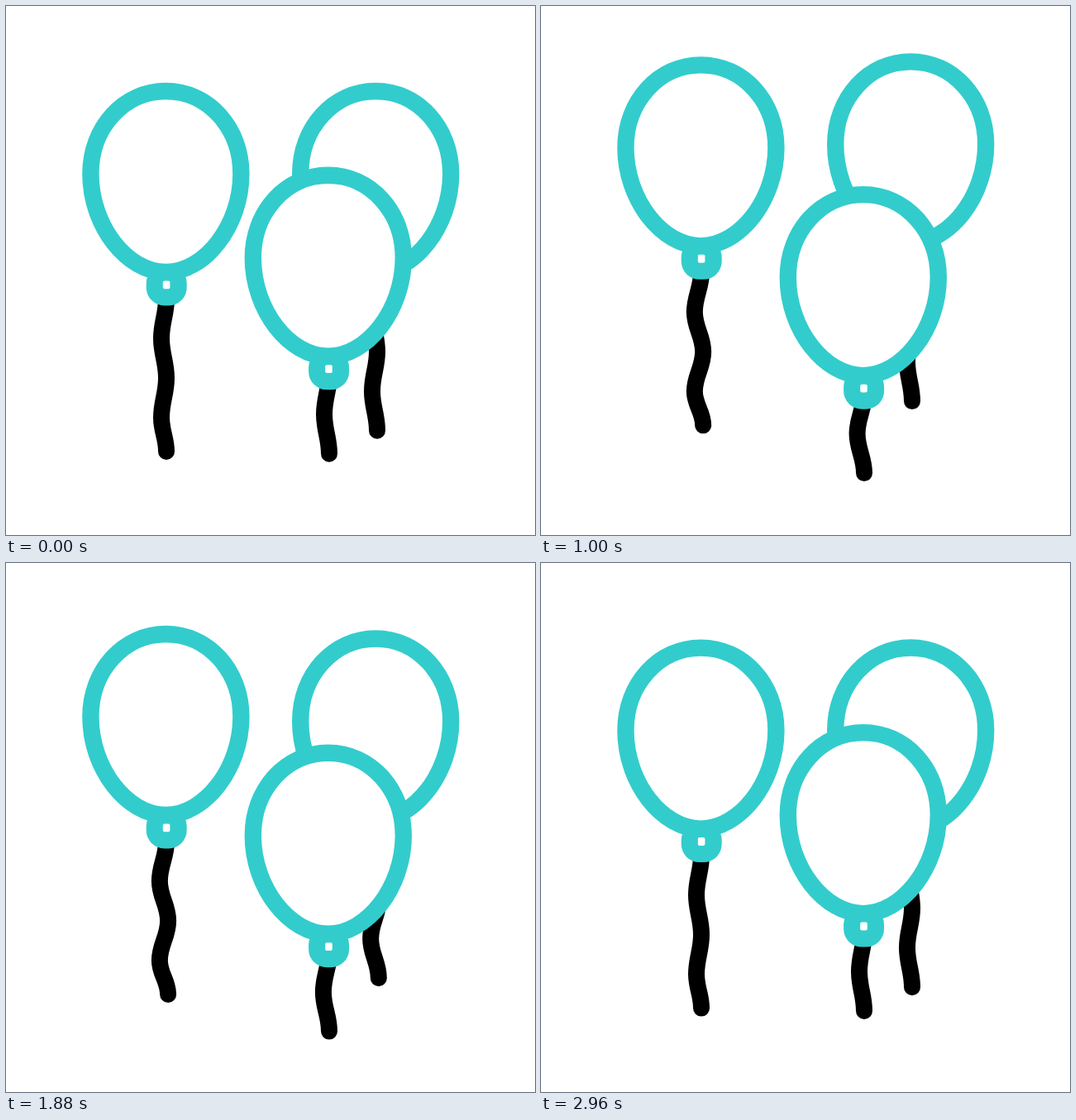
Recreate the animation shown at these times as an HTML page. Size 640x640 px, loop 3000 ms.

```html
<!DOCTYPE html>
<html lang="en">
<head>
<meta charset="utf-8">
<title>Balloons</title>
<style>
  html, body { margin: 0; width: 100%; height: 100%; overflow: hidden; background: #fff; }
  svg { display: block; width: 100vw; height: 100vh; }
  .string { fill: none; stroke: #000; stroke-width: 20; stroke-linecap: round; }
  .skin { fill: #fff; stroke: #33cccc; stroke-width: 20.4; }
  .knot { fill: #33cccc; }
  .hole { fill: #fff; }
</style>
</head>
<body>
<svg id="stage" viewBox="0 0 640 640"></svg>
<script>
const LOOP = 3000, STEP = 40;
const TRAVEL = 39;   // height of the float
const WAVE = 48;     // distance between two bends of a string
const BEND = 3;      // sideways reach of a bend at rest
const NS = "http://www.w3.org/2000/svg";
const stage = document.getElementById("stage");

// Back to front. "floats" and "sways" are the times at which each motion turns.
const balloons = [
  {
    x: 447.2, y: 203, dir: -1, floats: [870, 1590, 2395],
    string: { mid: 446, top: 370, bends: 3, end: 513.7, tip: 1 },
    sway: 2, sways: [430, 1000, 1640]
  },
  {
    x: 193.4, y: 203, dir: -1, floats: [803, 1512, 2315],
    string: { mid: 191, top: 402, bends: 3, end: 539, tip: 1 },
    sway: 2.7, sways: [1400]
  },
  {
    x: 389.8, y: 304.8, dir: 1, floats: [690, 1405, 2205],
    string: { mid: 388, top: 494, bends: 1, end: 541.7, tip: 0 },
    sway: 2.8, sways: [400]
  }
];

function add(parent, tag, attrs) {
  const el = document.createElementNS(NS, tag);
  for (const key in attrs) el.setAttribute(key, attrs[key]);
  parent.append(el);
  return el;
}

const ease = s => s * s * (3 - 2 * s);

// Goes back and forth between 0 and 1, turning at the given times.
function swing(turns, t) {
  const times = [0, ...turns, LOOP];
  const i = times.findIndex(end => end > t);
  const e = ease((t - times[i - 1]) / (times[i] - times[i - 1]));
  return i % 2 ? e : 1 - e;
}

function stringPath({ mid, top, bends, end, tip }, sway) {
  let y = top - WAVE;
  let x = mid + BEND;
  let d = `M${x},${y}`;
  for (let i = 0; i <= bends; i++) {
    const last = i === bends;
    const reach = BEND + sway * (last ? tip : 1);
    const nx = mid + (i % 2 ? reach : -reach);
    const ny = last ? end : top + i * WAVE;
    const h = (ny - y) * 0.4;
    d += `C${x},${y + h} ${nx},${ny - h} ${nx},${ny}`;
    [x, y] = [nx, ny];
  }
  return d;
}

// Egg around its widest line: rounder above, narrower below.
const egg = "M0-100C51-100 91-56 91 0C91 63 47 119 0 119C-47 119-91 63-91 0C-91-56-51-100 0-100Z";

for (const b of balloons) {
  b.group = add(stage, "g", {});
  b.line = add(b.group, "path", { class: "string" });
  const body = add(b.group, "g", { transform: `translate(${b.x} ${b.y})` });
  add(body, "path", { class: "skin", d: egg });
  add(body, "rect", { class: "knot", x: -23.7, y: 110.5, width: 49, height: 49, rx: 22 });
  add(body, "rect", { class: "hole", x: -3.6, y: 129.5, width: 8.6, height: 9.8, rx: 2 });
}

function draw(now) {
  const t = Math.floor((now % LOOP) / STEP) * STEP;
  for (const b of balloons) {
    const dy = b.dir * TRAVEL * swing(b.floats, t);
    b.group.setAttribute("transform", `translate(0 ${dy})`);
    b.line.setAttribute("d", stringPath(b.string, b.sway * swing(b.sways, t)));
  }
}

const start = performance.now();
function tick() {
  draw(performance.now() - start);
  requestAnimationFrame(tick);
}
tick();
</script>
</body>
</html>
```
